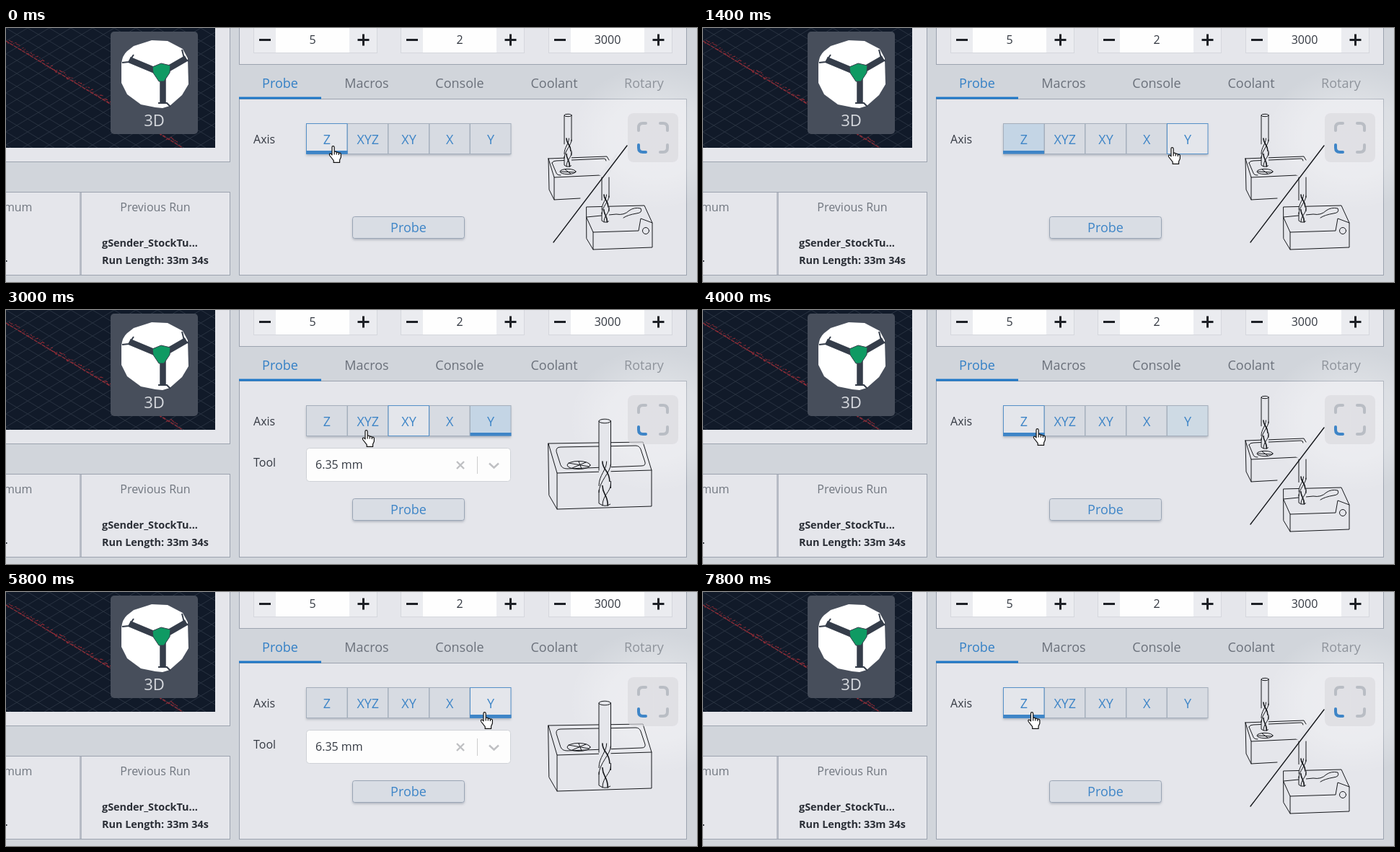
These frames come from a looping animation (958 px wide and 352 px high, 8200 ms). An HTML page:

```html
<!DOCTYPE html>
<html lang="en">
<head>
<meta charset="utf-8">
<title>Probe panel</title>
<style>
  html, body { margin: 0; width: 100%; height: 100%; overflow: hidden; background: #d1d5db; }
  svg { display: block; width: 958px; height: 352px; }
  text { font-family: "Open Sans", "Noto Sans", sans-serif; font-size: 16px; fill: #343942; }
  .card { fill: #e5e6eb; stroke: #9ca3af; }
  .mid { text-anchor: middle; }
  .tab { font-size: 18px; fill: #6b717b; text-anchor: middle; }
  .blue { font-size: 18px; fill: #3e85c7; text-anchor: middle; }
  .grey { fill: #70767f; }
  .bold { font-size: 14.4px; font-weight: 700; fill: #2a2e36; }
  .ink { fill: none; stroke: #16181c; stroke-width: 1; stroke-linejoin: round; stroke-linecap: round; }
  .solid { fill: #e5e6eb; }
</style>
</head>
<body>
<svg id="stage" viewBox="0 0 958 352">
  <defs>
    <pattern id="grid" width="30" height="18" patternUnits="userSpaceOnUse">
      <path d="M0 0L30 18M0 18L30 0" stroke="#293342" stroke-width=".9"/>
    </pattern>
    <radialGradient id="glow">
      <stop offset="0" stop-color="#fff" stop-opacity=".3"/>
      <stop offset=".55" stop-color="#fff" stop-opacity=".24"/>
      <stop offset="1" stop-color="#fff" stop-opacity="0"/>
    </radialGradient>
    <filter id="shade" x="-10%" y="-20%" width="120%" height="160%">
      <feDropShadow dx="0" dy="2" stdDeviation="1.5" flood-color="#4b5563" flood-opacity=".3"/>
    </filter>
  </defs>

  <!-- visualizer -->
  <rect class="card" x="-5.5" y="-5.5" width="316" height="191"/>
  <rect width="290" height="166" fill="#111a29"/>
  <rect width="290" height="166" fill="url(#grid)"/>
  <path d="M0 18L245 166" stroke="#8f2a34" stroke-width="1.3" stroke-dasharray="5 1.5"/>
  <g id="ticks" stroke="#9a2d37" stroke-width="1.1"></g>
  <rect x="145" y="5" width="121" height="142" rx="5" fill="#474e5b"/>
  <path fill="#fff" d="M168 32L177 25L202 17L224 18L245 29L252 42L253 78L244 93L227 108L217 111L207 110L187 106L168 92L160 76V50Q161 38 168 32Z"/>
  <g fill="none" stroke="#353d4a" stroke-width="8.5">
    <path d="M171 44L207 59M250 42L224 57M217.5 68V105"/>
    <path stroke-width="2" d="M161 48L170 47L177 37M244 30L247 42L253 46M211 104H223L228 109"/>
  </g>
  <path fill="#0f9a63" stroke="#353d4a" d="M203 54L215 49L228 52L227 62L219 74L212 74L204 62Z"/>
  <text class="mid" x="205.5" y="136" style="font-size:22px;fill:#d8dbe0">3D</text>

  <!-- job stats -->
  <rect class="card" x="-5.5" y="227.5" width="316" height="115"/>
  <rect x="102" y="228" width="3" height="114" fill="#b6bbc5"/>
  <text class="grey" x="36.5" y="254" text-anchor="end">Maximum</text>
  <rect y="322" width="1.5" height="2" fill="#23272e"/>
  <text class="grey mid" x="207" y="254">Previous Run</text>
  <text class="bold" x="133" y="303">gSender_StockTu...</text>
  <text class="bold" x="133" y="327">Run Length: 33m 34s</text>

  <!-- jog values and tabs -->
  <rect class="card" x="323.5" y="-5.5" width="620" height="56"/>
  <g id="steppers"></g>
  <rect class="card" x="323.5" y="98.5" width="620" height="244"/>
  <rect x="323" y="95.5" width="114" height="3" fill="#1f78c8"/>
  <ellipse cx="900" cy="152" rx="120" ry="100" fill="url(#glow)"/>
  <g id="tabs"></g>

  <!-- probe panel -->
  <text x="343" y="160">Axis</text>
  <rect x="416" y="132" width="284" height="43" fill="#d7dbe2" filter="url(#shade)"/>
  <g id="axes"></g>
  <rect x="480.5" y="261.5" width="155" height="30" rx="3" fill="#d9dde4" stroke="#9aa5b5" filter="url(#shade)"/>
  <text class="blue" x="558" y="283">Probe</text>

  <g id="plain" class="ink">
    <path d="M752 181L833 178L836 183M752 181L753 224L760 238L796 236M752 181L760 207L824 204M760 207V238M757 187Q758 184 763 184L829 181Q832 181 832 184M757 187L763 201Q764 204 769 204"/>
    <ellipse cx="779" cy="199" rx="11" ry="3.6"/>
    <path d="M769 199L789 200M775 196L783 202"/>
    <path d="M805 248L885 246L896 270V304L814 307L805 292ZM805 263L814 283L877 281L880 264L896 270M814 283V307M805 262L846 258Q857 260 864 253Q871 248 880 250Q883 256 874 257Q862 259 856 263"/>
    <circle cx="887" cy="281" r="4.5"/>
  </g>
  <g id="tooled">
    <g class="ink">
      <path d="M752 185L883 183L895 222V272L764 276L753 257ZM752 185L764 226L895 222M764 226V276M763 196Q762 190 769 190L873 188Q878 188 880 193L886 211Q887 216 881 216L778 220Q771 220 769 215Z"/>
      <ellipse cx="794" cy="215" rx="16" ry="5.5"/>
      <path d="M780 212L808 217M785 219L804 211M794 210L798 220"/>
    </g>
    <text x="343" y="217">Tool</text>
    <rect x="416.5" y="191.5" width="283" height="46" rx="4" fill="#fdfdfd" stroke="#cfd2d7"/>
    <text x="429" y="220">6.35 mm</text>
    <path d="M625 210L635 220M635 210L625 220M670 212.5L676.5 218.5L683 212.5" fill="none" stroke="#bfc0c3" stroke-width="2.4"/>
    <path d="M653.5 203V227" stroke="#ccc"/>
  </g>

  <rect x="862" y="118" width="70" height="68" rx="8" fill="#dadbdf" opacity=".65"/>
  <g id="corners" fill="none" stroke="#b9bdc4" stroke-width="4" stroke-linecap="round"></g>

  <path id="hand" fill="#fff" stroke="#111" stroke-width="1.2" stroke-linejoin="round"
    d="M4 2.2Q4 .6 5.5 .6T7.2 2.2V8.6Q9.2 7.4 10.3 9.4Q12.3 8.4 13.4 10.4Q15.8 9.6 16.4 12V16L14.6 20V23.4H6.2V20.6L1 14Q-.4 11.6 1.4 11Q3 11 4 13ZM7.2 8.6V12.5M10.3 9.4V12.5M13.4 10.4V13"/>
</svg>
<script>
const LOOP = 8200, STEP = 200, LAG = 150;
const $ = id => document.getElementById(id);

function add(parent, tag, attrs, text) {
  const el = document.createElementNS("http://www.w3.org/2000/svg", tag);
  for (const k in attrs) el.setAttribute(k, attrs[k]);
  if (text) el.textContent = text;
  parent.appendChild(el);
  return el;
}

// scale marks along the red axis
let seed = 7;
const rnd = () => (seed = seed * 16807 % 2147483647) / 2147483647;
for (let x = 2; x < 240; x += 2) {
  const y = 18 + x * 0.604 + 2 - rnd() * 7;
  add($("ticks"), "path", { d: `M${x} ${y}l${1 + rnd() * 2} ${rnd() * 3 - 1}`, opacity: 0.5 + rnd() * 0.5 });
}

[[343, "5"], [547, "2"], [752, "3000"]].forEach(([x, value]) => {
  const g = $("steppers");
  add(g, "rect", { x: x + 0.5, y: -4.5, width: 171, height: 39, fill: "#ebecf0", stroke: "#d5d7dd" });
  add(g, "rect", { x: x + 31, y: 0, width: 102, height: 34, fill: "#fefefe" });
  add(g, "path", { d: `M${x + 8} 16.5h16M${x + 144.5} 16.5h16M${x + 152.5} 8.5v16`, stroke: "#1d2026", "stroke-width": 3 });
  add(g, "text", { class: "mid", x: x + 82, y: 22 }, value);
});

[["Probe", 380, "#3480c6"], ["Macros", 500], ["Console", 629], ["Coolant", 760], ["Rotary", 884.5, "#8f949c"]]
  .forEach(([name, x, fill]) => add($("tabs"), "text", { class: "tab", x, y: 83, style: fill ? `fill:${fill}` : "" }, name));

[0, 90, 180, 270].forEach(a => add($("corners"), "path", {
  d: "M877 142V138Q877 132 883 132H887",
  transform: `rotate(${a} 897 152)`,
  ...(a === 270 && { stroke: "#3e85c7" })
}));

// end mill: shank from top to mid, twisted flutes from mid to end
function endMill(parent, x, w, top, mid, end, cap) {
  const g = add(parent, "g", { class: "ink" });
  const X = k => x + w * k, Y = k => mid + (end - mid) * k;
  const curve = (k0, y0, k1, y1) =>
    `M${X(k0)} ${Y(y0)}C${X(k0)} ${Y(y0 + 0.2)} ${X(k1)} ${Y(y1 - 0.25)} ${X(k1)} ${Y(y1)}`;
  add(g, "path", { class: "solid", stroke: "none", d: `M${x} ${top}H${X(1)}V${end}H${x}Z` });
  add(g, "path", { d: `M${x} ${top}V${Y(0.2)}M${X(1)} ${top}V${Y(0.1)}M${X(1)} ${Y(0.45)}V${Y(0.6)}M${x} ${Y(0.65)}V${Y(0.95)}Q${X(0.5)} ${Y(1.05)} ${X(0.95)} ${Y(0.97)}` });
  if (cap) add(g, "ellipse", { class: "solid", cx: X(0.5), cy: top, rx: w / 2, ry: w * 0.17 });
  add(g, "path", { d: curve(1, 0.05, 0, 0.7) + curve(0.65, 0, 0, 0.55) + curve(1, 0.5, 0.3, 1) });
  add(g, "path", { d: curve(0.3, 0, 0.9, 0.45) + curve(0.3, 0.55, 0.75, 1), "stroke-width": 1.6 });
}
endMill($("plain"), 774, 10, 121, 153, 192, true);
endMill($("plain"), 826, 10, 207, 231, 269, false);
add($("plain"), "path", { d: "M822 204L848 172L836 205Z", fill: "#e5e6eb", stroke: "none" });
add($("plain"), "path", { d: "M759 297L861 163", "stroke-width": 1.4 });
endMill($("tooled"), 822, 16.5, 154, 210, 271, true);

const edges = [416, 473, 529.5, 586.5, 643, 700];
const buttons = ["Z", "XYZ", "XY", "X", "Y"].map((name, i) => {
  const x = edges[i], width = edges[i + 1] - x, g = add($("axes"), "g", {});
  return {
    group: g,
    box: add(g, "rect", { x: x + 0.5, y: 132.5, width: width - 0.5, height: 42 }),
    bar: add(g, "rect", { x, y: 170, width: width + 0.5, height: 4.5, fill: "#3e85c7" }),
    label: add(g, "text", { class: "blue", x: x + width / 2 + 0.5, y: 161 }, name)
  };
});

// pointer path: time, x, y
const path = [
  [0, 448, 163], [200, 452, 164], [400, 470, 166], [600, 505, 168], [1000, 595, 168],
  [1200, 641, 166], [1400, 645, 165], [1800, 662, 165], [2200, 662, 165], [2600, 630, 166],
  [2800, 565, 167], [3000, 494, 166], [3200, 470, 165], [3600, 456, 164], [4200, 459, 164],
  [4600, 505, 168], [5000, 572, 168], [5400, 648, 166], [5800, 658, 166], [6200, 658, 166],
  [6600, 625, 167], [6800, 519, 168], [7000, 475, 168], [7400, 451, 166], [8200, 450, 166]
];
// selection changes: time, button
const picks = [[0, 0], [1800, 4], [4000, 0], [5600, 4], [7600, 0]];

function pointer(t) {
  const i = Math.max(1, path.findIndex(p => p[0] >= t));
  const [t0, x0, y0] = path[i - 1], [t1, x1, y1] = path[i];
  const k = (t - t0) / (t1 - t0);
  return [x0 + (x1 - x0) * k, y0 + (y1 - y0) * k];
}
const picked = t => picks.filter(p => p[0] <= t).pop()[1];

function draw(now) {
  let t = Math.floor(now % LOOP / STEP) * STEP;
  if (t === 8000) t = 7800;
  const [x, y] = pointer(t);
  const tip = pointer((t - LAG + LOOP) % LOOP)[0] + 5;
  const hover = edges.findIndex(e => e > tip) - 1;
  const sel = picked(t), before = picked(Math.max(0, t - STEP));

  buttons.forEach((b, i) => {
    const over = i === hover, on = i === sel;
    b.box.setAttribute("fill", over ? "#e4e6eb" : on ? "#c4d5e5" : i === before ? "#cedae4" : "#d7dbe2");
    b.box.setAttribute("stroke", over ? "#5590c8" : "#a5afbc");
    b.bar.style.display = on ? "" : "none";
  });
  if ($("axes").lastChild !== buttons[hover].group) $("axes").appendChild(buttons[hover].group);

  $("plain").style.display = sel === 0 ? "" : "none";
  $("tooled").style.display = sel === 0 ? "none" : "";
  $("hand").setAttribute("transform", `translate(${x.toFixed(1)} ${y.toFixed(1)})`);
}

function tick() {
  draw(performance.now());
  requestAnimationFrame(tick);
}
tick();
</script>
</body>
</html>
```
